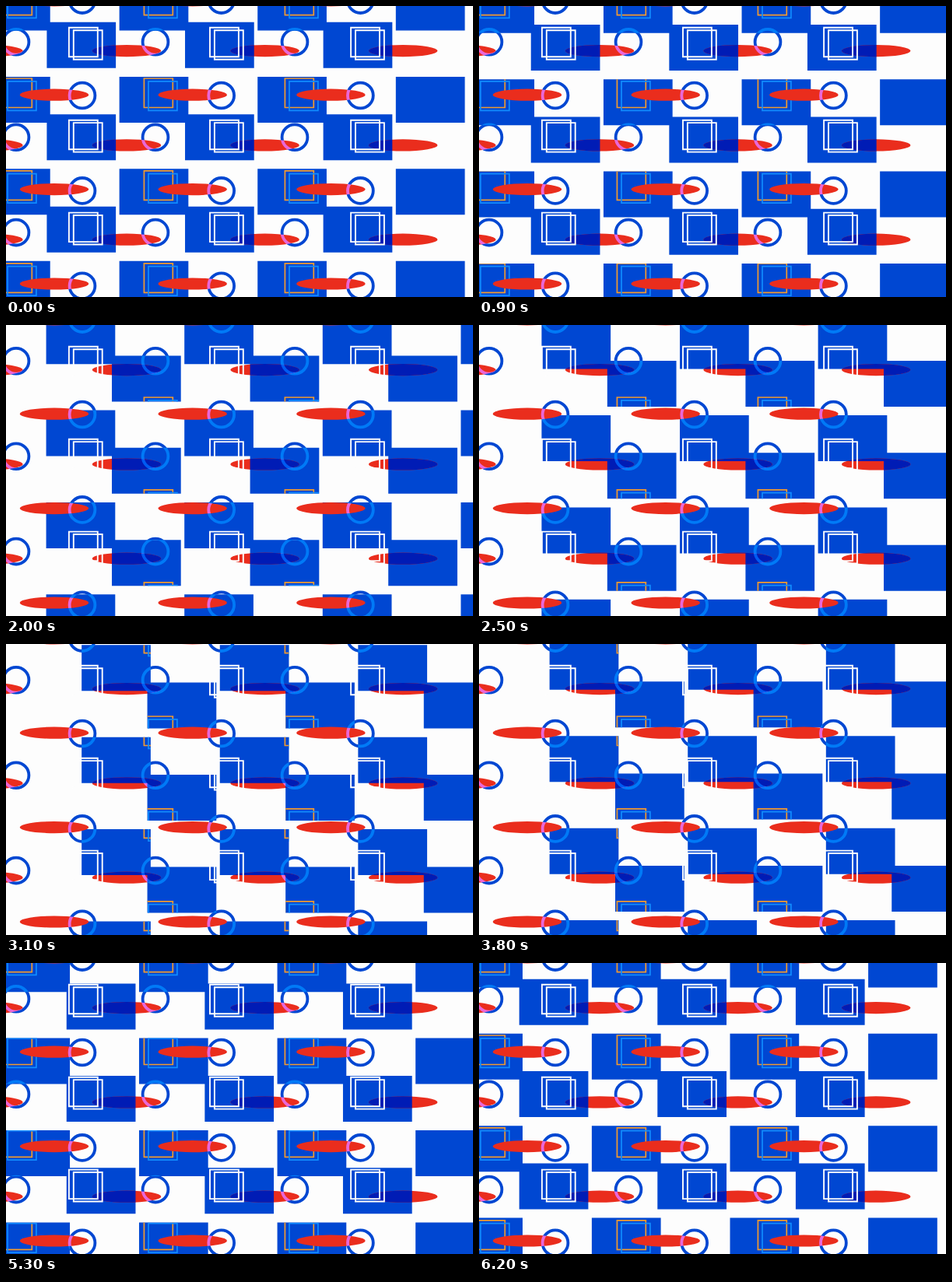
An HTML page for the animation above (6300 ms loop, 600 by 374 pixels).

```html
<!DOCTYPE html>
<html lang="en">
<head>
<meta charset="utf-8">
<title>Sliding pattern</title>
<style>
  html, body { margin: 0; width: 100%; height: 100%; overflow: hidden; background: #fdfdfd; }
  svg { display: block; width: 600px; height: 374px; }
  #art { isolation: isolate; }
  .tile { fill: #0047d2; }
  .red { fill: #ea2d1d; }
  .navy { fill: #001cb5; }
  .line { fill: none; stroke-width: 1.7; }
  .orange { stroke: #f29a2e; }
  .sky { stroke: #108cff; }
  .white { stroke: #fdfdfd; stroke-width: 1.9; }
  .ring { fill: none; stroke: #0047d2; stroke-width: 3.8; mix-blend-mode: screen; }
</style>
</head>
<body>
<svg viewBox="0 0 600 374">
  <defs>
    <clipPath id="onTiles"><path class="slide"/></clipPath>
  </defs>
  <g id="art">
    <path class="slide tile"/>
    <g clip-path="url(#onTiles)">
      <path id="orange" class="line orange"/>
      <path id="sky" class="line sky"/>
    </g>
    <path id="redA" class="red"/>
    <path id="redB" class="red"/>
    <g clip-path="url(#onTiles)"><path id="navy" class="navy"/></g>
    <path id="whiteA" class="line white"/>
    <path id="whiteB" class="line white"/>
    <path id="ringA" class="ring"/>
    <path id="ringB" class="ring"/>
  </g>
</svg>
<script>
const box = (w, h) => (x, y) => `M${x} ${y}h${w}v${h}h${-w}z`;
const oval = (rx, ry) => (x, y) =>
  `M${x - rx} ${y}a${rx} ${ry} 0 1 1 ${2 * rx} 0a${rx} ${ry} 0 1 1 ${-2 * rx} 0z`;

// Repeats a shape from (x, y) with pitch (dx, dy)
function grid(shape, x, y, dx, dy, cols, rows) {
  let d = '';
  for (let r = 0; r < rows; r++)
    for (let c = 0; c < cols; c++) d += shape(x + c * dx, y + r * dy);
  return d;
}

const draw = (id, d) => document.getElementById(id).setAttribute('d', d);
const tile = box(88.7, 59), square = box(36.9, 37.5);
const blob = oval(44.3, 7.6), ring = oval(16.4, 16.4);
const blobsB = grid(blob, -22.6, 57.6, 177.6, 121.3, 4, 3);

draw('orange', grid(square, -3.6, 93, 181, 118.9, 3, 4).concat(grid(square, -3.6, -25.9, 181, 0, 3, 1)));
draw('sky', grid(square, 2, 96.8, 181, 118.9, 3, 4).concat(grid(square, 2, -22.1, 181, 0, 3, 1)));
draw('redA', grid(blob, 62, -7.2, 177.7, 121.4, 3, 4));
draw('redB', blobsB);
draw('navy', blobsB);
draw('whiteA', grid(square, 80.9, 27.8, 181.1, 118.9, 3, 3));
draw('whiteB', grid(square, 86.8, 31.2, 181.1, 118.9, 3, 3));
draw('ringA', grid(ring, 98, -7.4, 178.7, 122.4, 3, 4));
draw('ringB', grid(ring, 13, 46.3, 179, 122.4, 3, 3));

const slides = document.querySelectorAll('.slide');
const tiles = grid(tile, -31.4, -27.3, 177.6, 118.4, 4, 4) +
              grid(tile, 53, 21, 177.6, 118.4, 3, 3);
slides.forEach(p => p.setAttribute('d', tiles));

// Same curve as CSS ease-in-out, solved by bisection
function ease(x) {
  let lo = 0, hi = 1;
  for (let i = 0; i < 24; i++) {
    const s = (lo + hi) / 2, q = 1 - s;
    if (1.26 * q * q * s + 1.74 * q * s * s + s * s * s < x) lo = s; else hi = s;
  }
  return lo * lo * (3 - 2 * lo);
}

const LOOP = 6300, STEP = 100;
const LOW = -1.3, SPAN = 131, START = 155, TOP = 3310, END = 6190, SLOPE = 0.2225;

function shift(t) {
  if (t < START) return LOW + SPAN * ease((START - t) / (END - TOP));
  if (t < TOP) return LOW + SPAN * ease((t - START) / (TOP - START));
  if (t < END) return LOW + SPAN * ease((END - t) / (END - TOP));
  return LOW + SPAN * ease((t - END) / (TOP - START));
}

const born = performance.now();
function tick() {
  const t = (performance.now() - born) % LOOP;
  const x = shift(Math.floor(t / STEP) * STEP);
  const move = `translate(${x.toFixed(2)} ${(x * SLOPE).toFixed(2)})`;
  slides.forEach(p => p.setAttribute('transform', move));
  requestAnimationFrame(tick);
}
tick();
</script>
</body>
</html>
```
